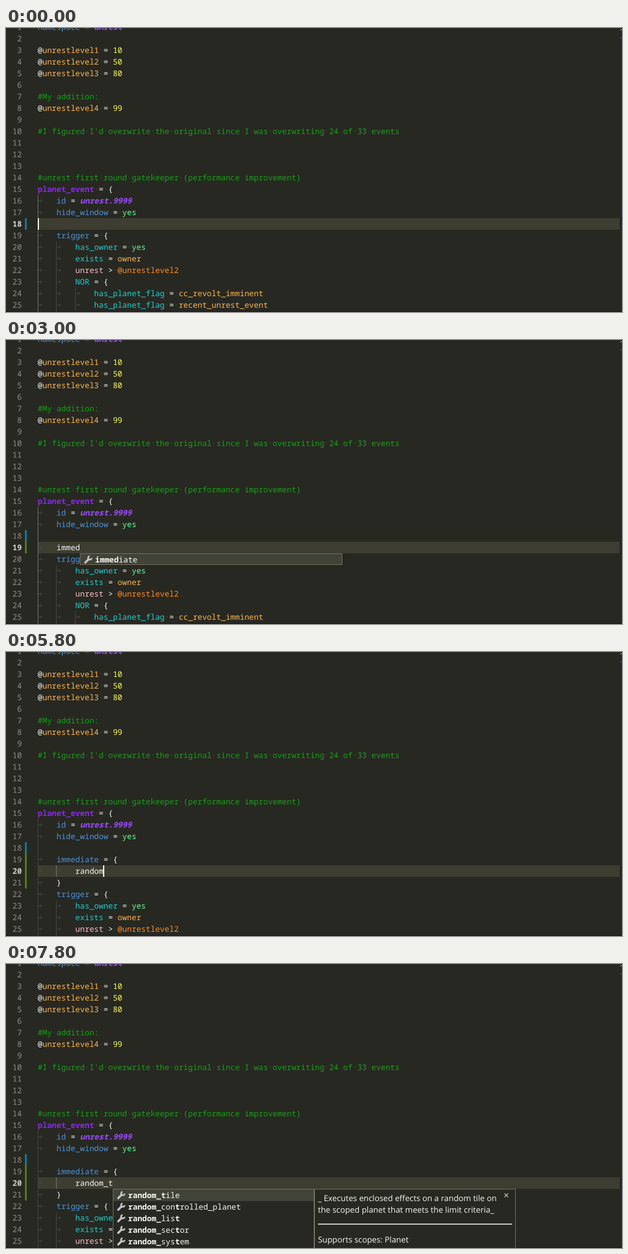
These frames come from a looping animation (1009x466 px, 8000 ms). An HTML page with a canvas:

```html
<!DOCTYPE html>
<html lang="en">
<head>
<meta charset="utf-8">
<title>Code editor with completion</title>
<style>
  html, body { margin: 0; width: 100%; height: 100%; overflow: hidden; background: #272822; }
  canvas { display: block; width: 1009px; height: 466px; }
</style>
</head>
<body>
<canvas id="stage"></canvas>
<script>
const W = 1009, H = 466, LOOP = 8000;
const LEFT = 52, CHAR = 7.697, LINE = 19;
const MONO = '12.83px "Noto Sans Mono", monospace';
const SANS = '13.3px "Open Sans", sans-serif';
const C = {
  bg: '#272822', text: '#f8f8f2', line: '#3e3d32', dim: '#464741', guide: '#767771',
  number: '#90908a', border: '#75715e', selected: '#414339',
  changed: '#0c7d9d', added: '#587c0c',
  comment: '#12a312', key: '#4d94dc', event: '#8a2be2', id: '#9c4dff',
  value: '#ffb54d', digits: '#ffff55', yes: '#66ff99', check: '#1fcfcf',
  variable: '#ff8c1f', pink: '#ffc0cb'
};

const canvas = document.getElementById('stage');
const ctx = canvas.getContext('2d');
const scale = window.devicePixelRatio || 1;
canvas.width = W * scale;
canvas.height = H * scale;

const head = `namespace = unrest

@unrestlevel1 = 10
@unrestlevel2 = 50
@unrestlevel3 = 80

#My addition:
@unrestlevel4 = 99

#I figured I'd overwrite the original since I was overwriting 24 of 33 events



#unrest first round gatekeeper (performance improvement)
planet_event = {
\tid = unrest.9999
\thide_window = yes`.split('\n');

const tail = `\ttrigger = {
\t\thas_owner = yes
\t\texists = owner
\t\tunrest > @unrestlevel2
\t\tNOR = {
\t\t\thas_planet_flag = cc_revolt_imminent
\t\t\thas_planet_flag = recent_unrest_event
\t\t}`.split('\n');

const wordColors = {
  namespace: C.key, id: C.key, hide_window: C.key, trigger: C.key, immediate: C.key,
  has_owner: C.check, exists: C.check, NOR: C.check, has_planet_flag: C.check,
  owner: C.value, cc_revolt_imminent: C.value, recent_unrest_event: C.value,
  yes: C.yes
};

// Each timeline is a list of [start, value]; the last one started applies.
const timelines = {
  caret: [[0, 1], [400, 0], [800, 1], [3000, 0], [3400, 1], [3800, 0], [4400, 1],
          [4800, 0], [5400, 1], [6800, 0], [7200, 1], [7800, 0]],
  first: [[0, ''], [1800, 'i'], [2000, 'imm'], [2200, 'imme'], [2400, 'immed']],
  second: [[0, ''], [5400, 'ra'], [5600, 'rand'], [5800, 'random'], [6200, 'random_'], [6400, 'random_t']],
  list: [[0, null], [2600, 'block'], [3400, null], [6200, 'all'], [6400, 'tile']],
  info: [[0, null], [6200, 'chance'], [6600, 'tile']],
  thumb: [[0, 1], [7200, 0.75], [7400, 0.5], [7600, 0.25], [7800, 0]]
};

// Asterisks enclose the matched letters.
const lists = {
  block: { width: 430, height: 19, rows: ['*immed*iate'] },
  all: {
    width: 330, height: 230, thumb: 58,
    rows: ['*random_*ambient_object', '*random_*bordering_country', '*random_*combatant_fleet',
           '*random_*controlled_planet', '*random_*country']
  },
  tile: {
    width: 330, height: 230, thumb: 76,
    rows: ['*random_t*ile', '*random_*con*t*rolled_planet', '*random_*lis*t*',
           '*random_*sec*t*or', '*random_*sys*t*em']
  }
};

const infos = {
  chance: ['_ All enclosed effects may or may not be', 'executed depending on set chance_',
           'Supports scopes: Country, Leader, System, Planet,'],
  tile: ['_ Executes enclosed effects on a random tile on', 'the scoped planet that meets the limit criteria_',
         'Supports scopes: Planet']
};

const at = (name, t) => timelines[name].filter(step => step[0] <= t).pop()[1];
const lineTop = n => LINE * n - 30;
const colX = col => LEFT + col * CHAR;

function rect(x, y, w, h, color) {
  ctx.fillStyle = color;
  ctx.fillRect(x, y, w, h);
}

function text(str, x, y, color, font = MONO) {
  ctx.font = font;
  ctx.fillStyle = color;
  ctx.fillText(str, x, y);
}

function stroke(points, color, width) {
  ctx.strokeStyle = color;
  ctx.lineWidth = width;
  ctx.beginPath();
  points.forEach(([x, y]) => ctx.lineTo(x, y));
  ctx.stroke();
}

function frame(x, y, w, h) {
  rect(x, y, w, h, C.border);
  rect(x + 1, y + 1, w - 2, h - 2, C.bg);
}

function drawTab(x, y) {
  stroke([[x + 1, y], [x + 7, y]], C.dim, 1);
  stroke([[x + 4.5, y - 2.5], [x + 7, y], [x + 4.5, y + 2.5]], C.dim, 1);
}

function drawWord(word, x, y, n) {
  if (word[0] === '@' && n < 15) {
    text('@', x, y, C.text);
    text(word.slice(1), x + CHAR, y, C.value);
  } else if (word[0] === '@') {
    text(word, x, y, C.variable);
  } else if (/^\d+$/.test(word)) {
    text(word, x, y, C.digits);
  } else if (word === 'planet_event') {
    text(word, x, y, C.event, 'bold ' + MONO);
  } else if (/^unrest/.test(word) && n < 18) {
    text(word, x, y, C.id, 'italic bold ' + MONO);
  } else {
    text(word, x, y, word === 'unrest' ? C.pink : wordColors[word] || C.text);
  }
}

function drawCode(line, n) {
  const y = lineTop(n) + 14;
  const comment = line[0] === '#';
  let col = 0;
  for (const part of line.match(/\t| |[^\t ]+/g) || []) {
    const x = colX(col);
    if (part === '\t') {
      drawTab(x, y - 4.5);
      col += 4;
    } else if (part === ' ') {
      text('·', x, y, C.dim);
      col += 1;
    } else {
      if (comment) text(part, x, y, C.comment);
      else drawWord(part, x, y, n);
      col += part.length;
    }
  }
  return col;
}

function drawGuides(line, n, activeLine, activeLevel) {
  const depth = line.trim() ? line.match(/^\t*/)[0].length : +(n > 15);
  for (let level = 0; level < depth; level++) {
    const active = level === activeLevel && (level === 0 || n === activeLine);
    rect(Math.floor(colX(level * 4)), lineTop(n), 1, LINE, active ? C.guide : C.dim);
  }
}

function drawWrench(x, y) {
  ctx.lineCap = 'round';
  stroke([[x + 1.8, y + 12.2], [x + 7.5, y + 6.5]], '#c5c5c5', 3.4);
  ctx.lineCap = 'butt';
  ctx.lineWidth = 2.6;
  ctx.beginPath();
  ctx.arc(x + 9.4, y + 4.6, 2.9, 0.05, Math.PI * 1.45);
  ctx.stroke();
}

function drawList(list, x, y, thumbAlpha) {
  frame(x, y, list.width, list.height);
  rect(x + 1, y + 1, list.width - 2, Math.min(LINE, list.height - 2), C.selected);
  list.rows.forEach((row, i) => {
    const top = y + 1 + i * LINE;
    drawWrench(x + 7, top + 2);
    let cx = x + 25;
    row.split('*').forEach((part, k) => {
      text(part, cx, top + 14, C.text, (k % 2 ? 'bold ' : '') + MONO);
      cx += part.length * CHAR;
    });
  });
  if (list.thumb) {
    rect(x + list.width - 11, y + 1, 10, list.thumb, `rgba(121,121,121,${0.4 * thumbAlpha})`);
  }
}

function drawInfo(lines, x, y) {
  frame(x, y, 330, 230);
  [20, 39, 88].forEach((dy, i) => text(lines[i], x + 6, y + dy, C.text, SANS));
  rect(x + 6, y + 57, 318, 1.5, C.text);
  const cx = x + 314.5, cy = y + 10.5;
  stroke([[cx - 3, cy - 3], [cx + 3, cy + 3]], '#b5b5b0', 1.4);
  stroke([[cx + 3, cy - 3], [cx - 3, cy + 3]], '#b5b5b0', 1.4);
}

function drawGutter(t) {
  const mark = (from, count, color) => rect(31, lineTop(from), 3, count * LINE, color);
  mark(18, t >= 1400 && t < 2600 ? 2 : 1, C.changed);
  if (t >= 2600) mark(19, t >= 3600 ? 3 : 1, C.added);
}

function draw(t) {
  const second = at('second', t);
  let edit, current;
  if (t < 1400) {
    edit = [''];
    current = 18;
  } else if (t < 3400) {
    edit = ['', '\t' + at('first', t)];
    current = 19;
  } else {
    edit = ['', '\timmediate = {', '\t\t' + second, '\t}'];
    current = 20;
  }
  const lines = [...head, ...edit, ...tail].slice(0, 26);

  ctx.setTransform(scale, 0, 0, scale, 0, 0);
  ctx.textRendering = 'geometricPrecision';
  rect(0, 0, W, H, C.bg);
  rect(0, 464, W, 2, '#231d24');
  rect(LEFT, lineTop(current), 953, LINE, C.line);
  rect(1006, 2, 3, 2, '#77783a');
  rect(1006, 15, 3, 2, '#1b5a57');
  drawGutter(t);

  let caretCol = 0;
  lines.forEach((line, i) => {
    const n = i + 1, label = String(n), isCurrent = n === current;
    drawGuides(line, n, current, second ? 1 : 0);
    if (n > 25) return;
    text(label, 26 - label.length * CHAR, lineTop(n) + 14,
      isCurrent ? '#d0d0cc' : C.number, (isCurrent ? 'bold ' : '') + MONO);
    const end = drawCode(line, n);
    if (isCurrent) caretCol = end;
  });

  const x = Math.floor(colX(caretCol)), y = lineTop(current);
  if (at('caret', t)) rect(x, y, 2, LINE, '#f8f8f0');

  const list = lists[at('list', t)], info = infos[at('info', t)];
  if (list) drawList(list, x, y + LINE, at('thumb', t));
  if (info) drawInfo(info, x + list.width, y + LINE);
}

function tick() {
  draw(performance.now() % LOOP);
  requestAnimationFrame(tick);
}
tick();
</script>
</body>
</html>
```
